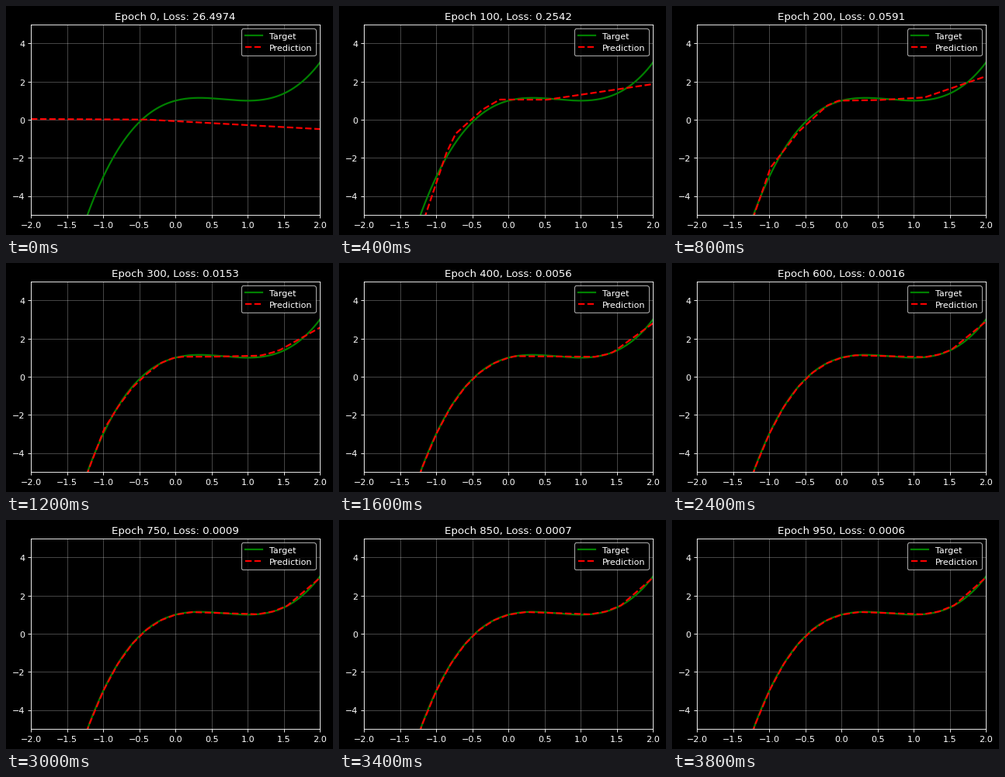
A matplotlib script that plays this animation: 421x296 px, repeating every 4000 ms.

```python
import numpy as np
import matplotlib.pyplot as plt
from matplotlib.animation import FuncAnimation
from matplotlib.text import Text
from matplotlib.transforms import Affine2D

W, H, DPI = 421, 296, 80
FRAMES, INTERVAL, EPOCH_STEP = 20, 200, 50
TEXT_DROP = 0.85  # pixels the lettering sits below its nominal baseline

plt.style.use("dark_background")
plt.rcParams["font.family"] = "DejaVu Sans"

x = np.linspace(-2, 2, 200)


def cubic(x):
    return x**3 - 2 * x**2 + x + 1


def bent(*knots):
    """Piecewise linear curve, like the output of a small ReLU network."""
    return np.interp(x, *zip(*knots))


def settled(epoch):
    """The cubic joined at kinks that drift as the right end closes its gap."""
    error = (400 / epoch) ** 1.65
    kinks = np.r_[np.linspace(-2, 0, 11), 0.3 - 0.2 * error, 1.1 + 0.1 * error,
                  1.35, 1.6 - 0.15 * error, 2]
    heights = cubic(kinks)
    heights[-1] -= 0.2 * error
    return np.interp(x, kinks, heights)


# Rough fits of the early phase, from the flat start to the settled curve
rough = {
    0: bent((-2, 0.04), (-0.4, 0.01), (2, -0.49)),
    50: bent((-2, -13.5), (-0.85, -2), (-0.1, 1.12), (2, 1.5)),
    100: bent((-2, -14.6), (-0.86, -1.75), (-0.73, -0.73), (-0.36, 0.53),
              (-0.12, 1.06), (0.53, 1.05), (2, 1.87)),
    200: bent((-2, -13.6), (-0.98, -2.5), (-0.6, -0.65), (-0.2, 0.74),
              (-0.04, 1), (0.5, 1.03), (1.15, 1.17), (2, 2.28)),
    400: settled(400),
}
losses = {0: 26.4974, 100: 0.2542, 200: 0.0591, 400: 0.0056,
          600: 0.0016, 750: 0.0009, 950: 0.0006}


def blend(keys, epoch):
    """Interpolate between keyed values on a logarithmic time scale."""
    a = max(k for k in keys if k <= epoch)
    b = min(k for k in keys if k >= epoch)
    if a == b:
        return keys[a]
    w = np.log((epoch + 50) / (a + 50)) / np.log((b + 50) / (a + 50))
    return (1 - w) * keys[a] + w * keys[b]


log_losses = {epoch: np.log(loss) for epoch, loss in losses.items()}

fig = plt.figure(figsize=(W / DPI, H / DPI), dpi=DPI)
ax = fig.add_axes([32.155 / W, 25.78 / H, 372 / W, 246.4 / H])
ax.plot(x, cubic(x), color="green", lw=2, label="Target")
prediction, = ax.plot(x, rough[0], "r--", lw=2, label="Prediction")
ax.set(xlim=(-2, 2), ylim=(-5, 5),
       xticks=np.arange(-2, 2.5, 0.5), yticks=range(-4, 5, 2))
ax.grid(True, alpha=0.3)
ax.legend(loc="upper right")
title = ax.set_title("")

drop = Affine2D().translate(0, -TEXT_DROP)
for text in ax.findobj(Text):
    text.set_transform(text.get_transform() + drop)


def update(frame):
    epoch = frame * EPOCH_STEP
    loss = np.exp(blend(log_losses, epoch))
    curve = blend(rough, epoch) if epoch <= 400 else settled(epoch)
    prediction.set_ydata(curve)
    title.set_text(f"Epoch {epoch}, Loss: {loss:.4f}")
    return prediction, title


anim = FuncAnimation(fig, update, frames=FRAMES, interval=INTERVAL,
                     init_func=lambda: update(0), repeat=True, repeat_delay=0)
plt.show()
```
